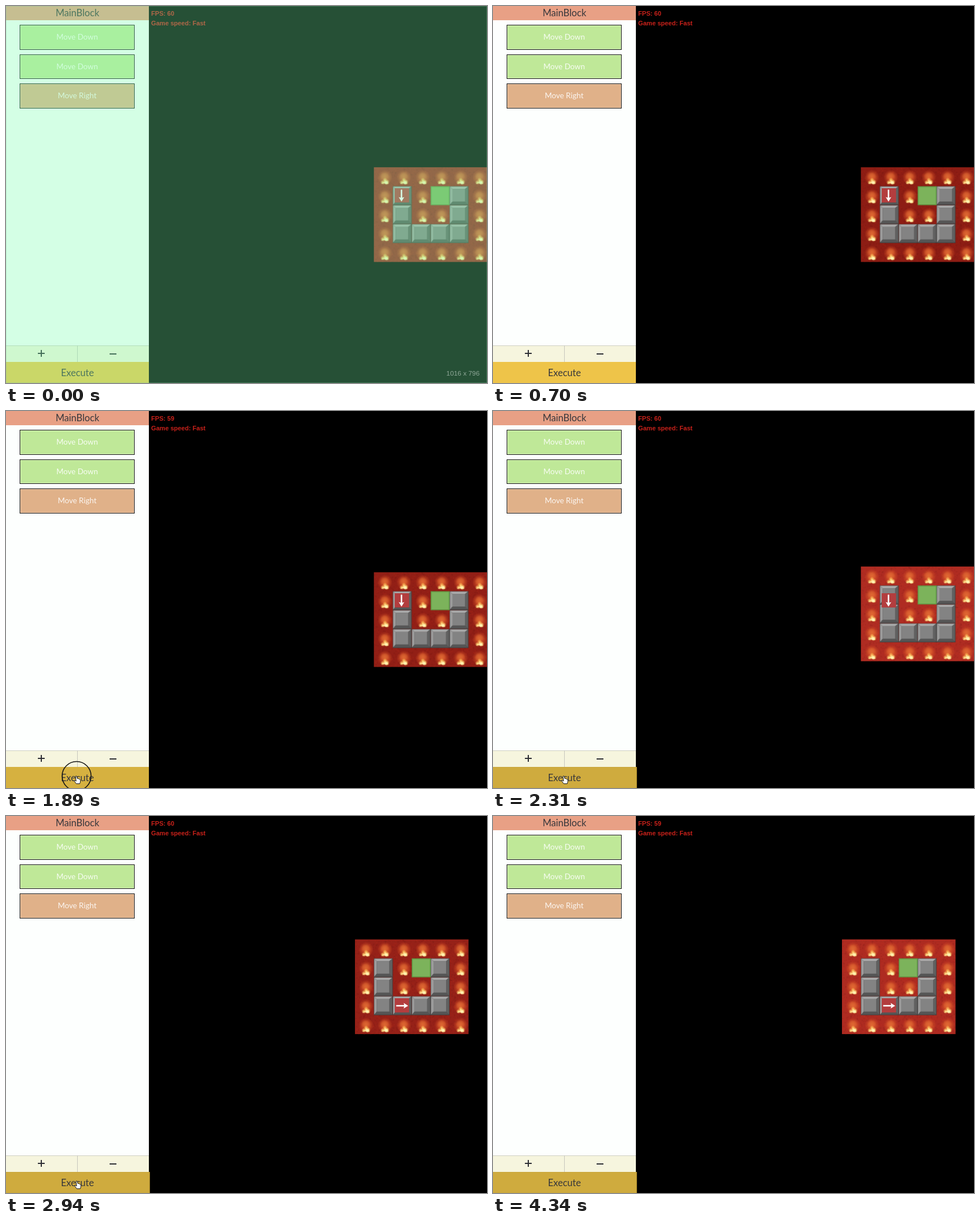
Animation, 845 px wide and 662 px high, one loop 4410 ms. Source, as an HTML page with a canvas:

```html
<!DOCTYPE html>
<html lang="en">
<head>
<meta charset="utf-8">
<title>Block maze</title>
<style>
  html, body { margin: 0; width: 100%; height: 100%; overflow: hidden; background: #000; }
  #stage { position: relative; width: 845px; height: 662px; overflow: hidden; background: #000; }
  #stage > *, #side > * { position: absolute; box-sizing: border-box; }
  #map { left: 0; top: 0; }
  #side { left: 0; top: 0; width: 251px; height: 662px; background: #fdfffe;
    font: 16.6px Lato, "Open Sans", sans-serif; color: #37373c; text-align: center; white-space: nowrap; }
  .head { left: 0; top: 0; width: 251px; height: 25px; line-height: 24px; background: #e8a085; }
  .cmd { left: 24px; width: 202px; height: 43.5px; line-height: 40px; font-size: 13.5px; color: rgba(255,255,255,.88);
    border: 1px solid #111; box-shadow: inset 0 0 0 1px rgba(255,255,255,.3); background: #bfe898; }
  .cmd.right { background: #e0b189; }
  .bar { left: 0; top: 596px; width: 251px; height: 29px; background: #f6f5de; border-top: 1px solid #cfcfc4; }
  .split { left: 125px; top: 596px; width: 1px; height: 29px; background: #c6c6bc; }
  .ink { background: #2c2d33; }
  #run { left: 0; top: 625px; width: 251px; height: 37px; }
  .label { left: 0; top: 625px; width: 251px; line-height: 38px; }
  .stat { left: 255px; font: bold 11.1px/14px "Liberation Sans", Arial, sans-serif; color: #c8211a; white-space: nowrap; }
  #tint { inset: 0; background: rgba(123,254,172,.315); border: 1px solid rgba(120,200,150,.3); }
  #size { right: 13px; top: 637px; font: 11.8px/16px "Liberation Sans", Arial, sans-serif; color: #8fa898; }
  #over { left: 0; top: 0; }
</style>
</head>
<body>
<div id="stage">
  <canvas id="map" width="845" height="662"></canvas>
  <div class="stat" style="top:6px">FPS: <span id="fps">60</span></div>
  <div class="stat" style="top:23px">Game speed: Fast</div>
  <div id="side">
    <div class="head">MainBlock</div>
    <div class="cmd" style="top:33px">Move Down</div>
    <div class="cmd" style="top:84.5px">Move Down</div>
    <div class="cmd right" style="top:136px">Move Right</div>
    <div class="bar"></div><div class="split"></div>
    <div class="ink" style="left:56px;top:609px;width:12px;height:2px"></div>
    <div class="ink" style="left:61px;top:604px;width:2px;height:12px"></div>
    <div class="ink" style="left:182px;top:610px;width:12px;height:2px"></div>
    <div id="run"></div>
    <div class="label">Execute</div>
  </div>
  <svg id="over" width="845" height="662">
    <circle id="ring" cx="124" cy="641" r="25.5" fill="none" stroke="#161616" stroke-width="1.6"/>
    <path id="arrow" d="M0 0V12.5L2.9 9.9L5 14.6L7 13.7L5 9.2H8.8Z" fill="#000" stroke="#fff" stroke-width=".9"/>
    <path id="hand" d="M-3-6C-3-7.5-1-7.5-.7-6L.2-2.5C1-3.2 2-2.8 2.2-2C3-2.4 3.9-2 4-1.1C5-1.2 5.5-.4 5.5.6V3.2L4.4 6.5H-1.6L-4.8 2.2C-5.6.8-4.4-.1-3.4.9L-1.9 2Z" fill="#fff" stroke="#111" stroke-width="1"/>
  </svg>
  <div id="tint"></div>
  <div id="size">1016 x 796</div>
</div>
<script>
const LOOP = 4410, STEP = 70, TILE = 33.25, COLS = 6, ROWS = 5;
const W = COLS * TILE, H = ROWS * TILE;
const RUN = 2257, MOVE = 175;
const PLAN = ['......', '.S.GS.', '.S..S.', '.SSSS.', '......'];
const $ = id => document.getElementById(id);
const ctx = $('map').getContext('2d');
const clamp = v => Math.max(0, Math.min(1, v));
const mix = (a, b, k) => a + (b - a) * k;

// piecewise path through [time, x, y] points, eased within each leg
function along(points, t) {
  let i = 0;
  while (i < points.length - 2 && t >= points[i + 1][0]) i++;
  const [a, b] = [points[i], points[i + 1]];
  let k = clamp((t - a[0]) / (b[0] - a[0]));
  k = k * k * (3 - 2 * k);
  return [mix(a[1], b[1], k), mix(a[2], b[2], k)];
}

function poly(g, color, ...pts) {
  g.fillStyle = color;
  g.beginPath();
  pts.forEach(([x, y]) => g.lineTo(x, y));
  g.fill();
}

function glow(g, x, y, rx, ry, rgb, alpha) {
  g.save();
  g.translate(x, y);
  g.scale(rx, ry);
  const grad = g.createRadialGradient(0, 0, 0, 0, 0, 1);
  grad.addColorStop(0, `rgba(${rgb},${alpha})`);
  grad.addColorStop(.5, `rgba(${rgb},${alpha * .7})`);
  grad.addColorStop(1, `rgba(${rgb},0)`);
  g.fillStyle = grad;
  g.fillRect(-1, -1, 2, 2);
  g.restore();
}

function flame(g, x, y) {
  glow(g, x + 19.5, y + 17.5, 13, 13, '222,90,42', .85);
  glow(g, x + 19, y + 16, 8, 8, '230,120,58', .6);
  glow(g, x + 16, y + 26.5, 4.5, 4, '255,205,110', .95);
  glow(g, x + 19.5, y + 22.5, 4, 4.5, '255,190,90', .9);
  glow(g, x + 22.5, y + 26, 5, 5, '255,215,115', .95);
  poly(g, '#ffdf90', [x + 13, y + 29], [x + 16, y + 25.5], [x + 18, y + 26], [x + 19, y + 21.5],
    [x + 21.5, y + 24.5], [x + 24, y + 24], [x + 25.5, y + 29], [x + 21, y + 29.5], [x + 18.5, y + 28]);
  glow(g, x + 21.5, y + 27, 3.5, 3, '255,250,190', 1);
}

function stone(g, x, y) {
  const a = .5, b = 32.4, c = 5, d = 27;
  const p = (u, v) => [x + u, y + v];
  g.fillStyle = '#3d3a3a';
  g.fillRect(x, y, TILE, TILE);
  poly(g, '#a9a9a9', p(a, a), p(b, a), p(d, c), p(c, c));
  poly(g, '#9c9c9c', p(a, a), p(c, c), p(c, d), p(a, b));
  poly(g, '#606060', p(b, a), p(b, b), p(d, d), p(d, c));
  poly(g, '#555', p(a, b), p(c, d), p(d, d), p(b, b));
  g.fillStyle = '#838383';
  g.fillRect(x + c, y + c, d - c, d - c);
}

function goal(g, x, y) {
  g.fillStyle = '#5f9c45';
  g.fillRect(x, y, TILE, TILE);
  g.fillStyle = '#7cb35b';
  g.fillRect(x + 1.5, y + 1.5, TILE - 3, TILE - 3);
}

function makeLayer() {
  const layer = document.createElement('canvas');
  layer.width = Math.ceil(W);
  layer.height = Math.ceil(H);
  const g = layer.getContext('2d');
  let seed = 7;
  const rnd = () => (seed = seed * 16807 % 2147483647) / 2147483647;
  for (let i = 0; i < 3000; i++) {
    g.fillStyle = rnd() < .5 ? 'rgba(70,0,0,.08)' : 'rgba(235,80,45,.07)';
    g.fillRect(rnd() * W, rnd() * H, 1 + rnd() * 2, 1 + rnd() * 2);
  }
  PLAN.forEach((row, r) => [...row].forEach((kind, c) => {
    const draw = { S: stone, G: goal }[kind] || flame;
    draw(g, c * TILE, r * TILE);
  }));
  return layer;
}

const layer = makeLayer();

function player(right) {
  ctx.save();
  ctx.translate(695.5, 332.5);
  ctx.fillStyle = '#b33d3e';
  ctx.fillRect(-12.5, -12.5, 25, 25);
  if (right) ctx.rotate(-Math.PI / 2);
  ctx.fillStyle = '#fff';
  ctx.fillRect(-2, -10, 2.6, 16);
  poly(ctx, '#fff', [-5.6, 3], [-.7, 4.5], [4.2, 3], [-.7, 11]);
  ctx.restore();
}

function drawMap(t) {
  const moved = Math.max(0, Math.min(3, (t - RUN) / MOVE));
  const x = 646.3 - Math.max(0, moved - 2) * TILE;
  const y = 283.2 - Math.min(2, moved) * TILE;
  const heat = Math.cos((t - 1260) / 1000 * 2 * Math.PI);
  ctx.clearRect(0, 0, 845, 662);
  ctx.fillStyle = `rgb(${158 + 18 * heat},${36 + 8 * heat},${27 + 7 * heat})`;
  ctx.fillRect(x, y, W, H);
  ctx.drawImage(layer, x, y);
  player(moved > 2);
}

const POINTER = [[1120, 205, 664], [1330, 163, 634], [1680, 121, 641], [1890, 121, 641]];
const HAND = [[1540, 140, 646], [1750, 125, 648], [2450, 126, 648], [3220, 126, 648], [3640, 265, 646], [3920, 300, 668]];

function place(el, path, t, from, to) {
  const on = t >= from && t < to;
  el.style.display = on ? '' : 'none';
  if (on) el.setAttribute('transform', `translate(${along(path, t)})`);
}

function render(t) {
  drawMap(t);
  $('fps').textContent = (t >= 910 && t < 2100) || t >= 4060 ? 59 : 60;
  place($('arrow'), POINTER, t, 1120, 1540);
  place($('hand'), HAND, t, 1540, 3920);
  $('ring').style.display = t >= 1820 && t < 2030 ? '' : 'none';

  const press = clamp((t - 1750) / 180);
  const run = $('run').style;
  run.background = `rgb(${mix(238, 207, press)},${mix(196, 171, press)},${mix(73, 62, press)})`;
  const raised = t >= 1960;
  run.width = raised ? '253px' : '251px';
  run.boxShadow = raised ? 'inset -1px 0 1px rgba(90,65,10,.5)' : 'none';

  const flash = t < STEP ? '' : 'none';
  $('tint').style.display = flash;
  $('size').style.display = flash;
}

const start = performance.now();
function tick() {
  const t = (performance.now() - start) % LOOP;
  render(Math.floor(t / STEP) * STEP);
  requestAnimationFrame(tick);
}
render(0);
requestAnimationFrame(tick);
</script>
</body>
</html>
```
